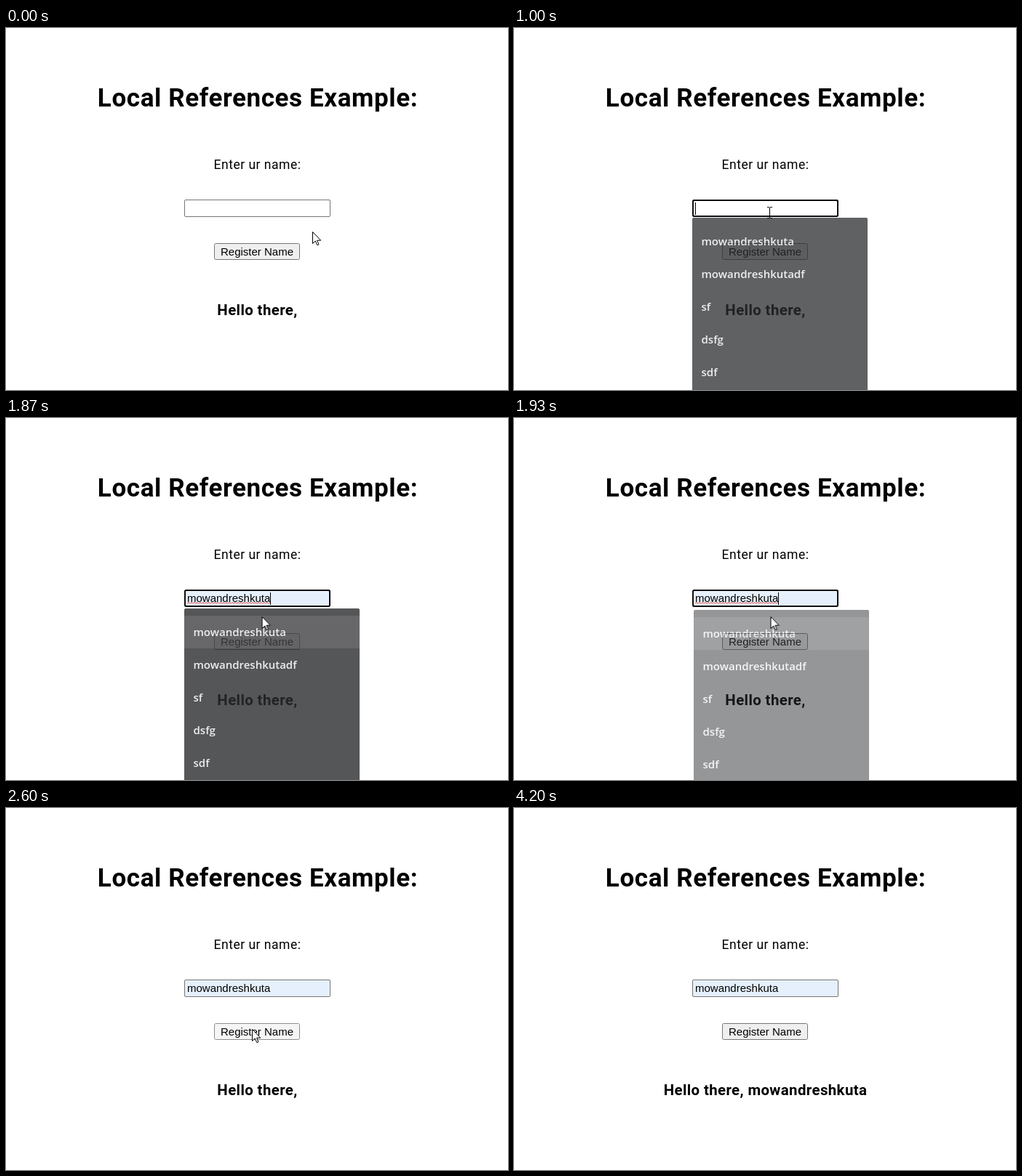
These frames come from a looping animation (690 by 498 pixels, 4.27 s). An HTML page:

```html
<!DOCTYPE html>
<html lang="en">
<head>
<meta charset="utf-8">
<title>Local References Example</title>
<style>
html, body { margin: 0; width: 100%; height: 100%; overflow: hidden; background: #fff; }
svg { display: block; }
.page { font-family: Roboto, "Open Sans", sans-serif; text-anchor: middle; }
.title { font-size: 35px; font-weight: 600; letter-spacing: .6px; }
.label { font-size: 17.5px; letter-spacing: .5px; }
.hello { font-size: 20.4px; font-weight: 600; letter-spacing: .4px; }
.field { font: 15px "Liberation Sans", Arial, sans-serif; }
.list text { font: 600 15px "Open Sans", "Noto Sans", sans-serif; fill: #e8eaed; }

/* Each timed part names its keyframes in --k */
.timed { animation: var(--k) 4.27s step-end infinite; }
.box { --k: box; fill: #fff; stroke: #767676; }
.button { --k: button; fill: #efefef; stroke: #767676; }
.cursor { --k: travel; animation-timing-function: ease-in-out; }

@keyframes box {
  0% { stroke: #767676; fill: #fff; }
  8.9% { stroke: #484848; fill: #fff; }
  31.15% { stroke: #767676; fill: #e5f0fc; }
  100% { stroke: #767676; fill: #e5f0fc; }
}
@keyframes focus {
  0% { opacity: 0; }
  20.37%, 43.79% { opacity: 1; }
  59.48%, 100% { opacity: 0; }
}
@keyframes emptyCaret {
  0% { opacity: 0; }
  20.37% { opacity: 1; }
  31.15%, 100% { opacity: 0; }
}
@keyframes filled {
  0% { opacity: 0; }
  31.15%, 100% { opacity: 1; }
}
@keyframes spelling {
  0% { opacity: 0; }
  43.79% { opacity: 1; }
  59.48%, 100% { opacity: 0; }
}
@keyframes endCaret {
  0% { opacity: 0; }
  43.79% { opacity: 1; }
  55.5%, 100% { opacity: 0; }
}
@keyframes list {
  0% { opacity: 0; transform: none; }
  21.78% { opacity: .35; transform: translate(2px, 3px); }
  23.42% { opacity: .75; transform: translate(1px, 1px); }
  25.06% { opacity: 1; transform: none; }
  43.79% { opacity: .8; transform: translate(1px, 2px); }
  45.1% { opacity: .5; transform: translate(3px, 4px); }
  46.84% { opacity: .2; transform: translate(5px, 6px); }
  48.48%, 100% { opacity: 0; transform: none; }
}
@keyframes button {
  0% { fill: #efefef; stroke: #767676; }
  56.2% { fill: #e5e5e5; stroke: #4f4f4f; }
  59.48% { fill: #f5f5f5; stroke: #8d8d8d; }
  62.53% { fill: #e5e5e5; stroke: #4f4f4f; }
  68%, 100% { fill: #efefef; stroke: #767676; }
}
@keyframes before {
  0% { opacity: 1; }
  62.53%, 100% { opacity: 0; }
}
@keyframes after {
  0% { opacity: 0; }
  62.53%, 100% { opacity: 1; }
}
@keyframes travel {
  0%, 1.64% { transform: translate(421px, 280px); }
  11.01%, 26.46% { transform: translate(351px, 254px); }
  32.79%, 43.79% { transform: translate(351.5px, 273px); }
  45.1%, 51.52% { transform: translate(352.5px, 273px); }
  57.85%, 65.57% { transform: translate(338px, 304px); }
  76.58%, 82.67% { transform: translate(487px, 268px); }
  90.63%, 100% { transform: translate(600px, 505px); }
}
@keyframes arrow {
  0% { opacity: 1; }
  8.9% { opacity: 0; }
  28.5%, 100% { opacity: 1; }
}
@keyframes beam {
  0% { opacity: 0; }
  8.9% { opacity: 1; }
  28.5%, 100% { opacity: 0; }
}
</style>
</head>
<body>
<svg width="690" height="498" viewBox="0 0 690 498">
  <defs>
    <pattern id="wave" width="4" height="3" patternUnits="userSpaceOnUse" x="249" y="253">
      <path d="M0 2.5L2 .5L4 2.5" fill="none" stroke="#e03030"/>
    </pattern>
  </defs>

  <g class="page">
    <text class="title" x="346" y="108">Local References Example:</text>
    <text class="label" x="345.5" y="194">Enter ur name:</text>
    <text class="hello timed" style="--k: before" x="345.5" y="395">Hello there,</text>
    <text class="hello timed" style="--k: after" x="345.5" y="395">Hello there, mowandreshkuta</text>
  </g>

  <g class="field">
    <rect class="box timed" x="245.5" y="236.5" width="200" height="23" rx="1.5"/>
    <rect class="timed" style="--k: focus" x="246" y="237" width="199" height="22" rx="2"
          fill="none" stroke="#101010" stroke-width="2"/>
    <path class="timed" style="--k: emptyCaret" d="M249.5 240V257" stroke="#000"/>
    <text class="timed" style="--k: filled" x="249" y="253">mowandreshkuta</text>
    <rect class="timed" style="--k: spelling" x="249" y="253" width="114" height="3" fill="url(#wave)"/>
    <path class="timed" style="--k: endCaret" d="M363.5 240V257" stroke="#000"/>
    <rect class="button timed" x="286.5" y="296.5" width="117" height="22" rx="2"/>
    <text x="345" y="313" text-anchor="middle">Register Name</text>
  </g>

  <g class="list timed" style="--k: list">
    <rect x="244" y="260" width="241" height="250" rx="2" fill="#2b2c2f"/>
    <rect class="timed" style="--k: filled" x="244" y="270" width="241" height="45" fill="#414245"/>
    <text x="256.5" y="298">mowandreshkuta</text>
    <text x="256.5" y="343">mowandreshkutadf</text>
    <text x="256.5" y="388">sf</text>
    <text x="256.5" y="433">dsfg</text>
    <text x="256.5" y="478">sdf</text>
  </g>

  <g class="cursor timed">
    <path class="timed" style="--k: arrow" d="M.5 .5V16.5L4.2 13L6.8 18.7L9 17.8L6.5 12.2H11.7Z"
          fill="#fff" stroke="#000"/>
    <path class="timed" style="--k: beam" d="M-3 -7.5H0M1 -7.5H4M.5 -7V7M-3 7.5H0M1 7.5H4"
          fill="none" stroke="#000"/>
  </g>
</svg>
</body>
</html>
```
